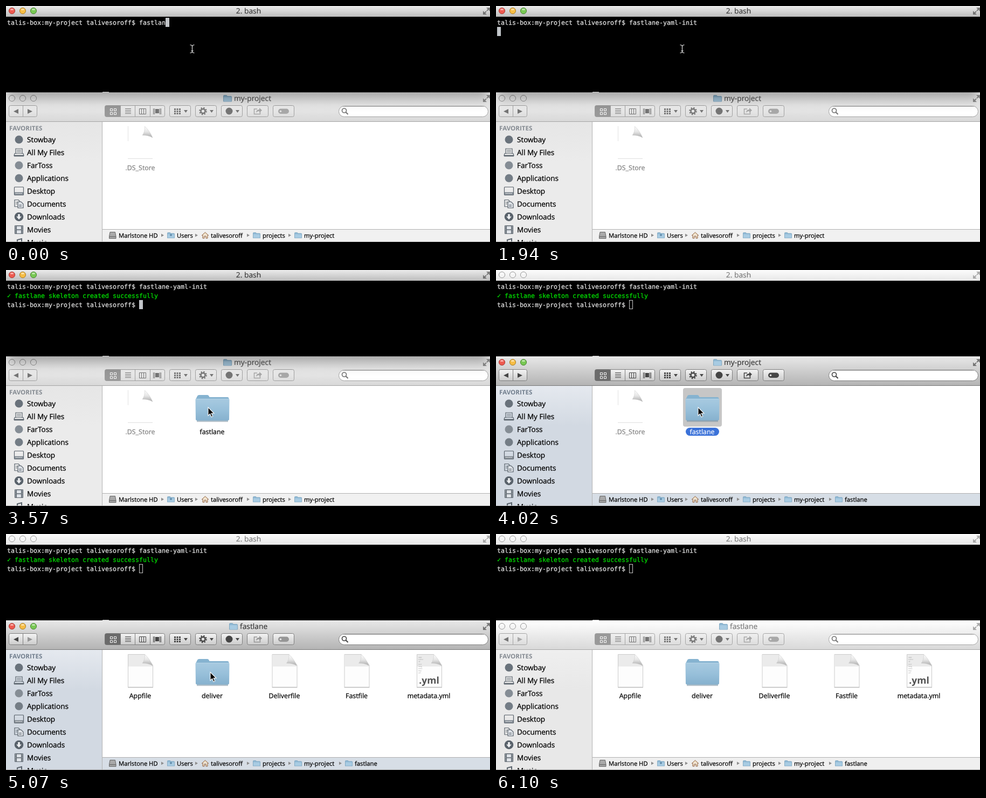
Write an HTML page that moves like this. It is 898 px wide and 440 px high and loops after 6200 ms.

```html
<!DOCTYPE html>
<html lang="en">
<head>
<meta charset="utf-8">
<title>Project setup</title>
<style>
html, body { margin: 0; width: 100%; height: 100%; overflow: hidden; background: #fff; }
svg { display: block; width: 898px; height: 440px; text-rendering: geometricPrecision;
  font-family: "Open Sans", "Noto Sans", sans-serif; }
svg.term { --t1: #ebebeb; --t2: #bcbcbc; --tink: #3a3a3a;
  --f1: #fdfdfd; --f2: #e8e8e8; --f3: #d8d8d8; --fink: #555; --ink: #757575; --dim: #a8a8a8;
  --b1: #f0f0f0; --b2: #dcdcdc; --edge: #a0a0a0; --sel: #999; --line: #a5a5a5;
  --s1: #e6e6e6; --s2: #ebebeb; --path: #f1f1f1; --head: #858b92; }
svg.find { --t1: #fcfcfc; --t2: #e7e7e7; --tink: #7b7b7b;
  --f1: #e8e8e8; --f2: #cdcdcd; --f3: #b3b3b3; --fink: #333; --ink: #454545; --dim: #969696;
  --b1: #f4f4f4; --b2: #cbcbcb; --edge: #7d7d7d; --sel: #6b6b6b; --line: #777;
  --s1: #e5e9ef; --s2: #d2d9e2; --path: #d7dee6; --head: #727f8e; }
svg.idle { --t1: #fcfcfc; --t2: #e7e7e7; --tink: #7b7b7b;
  --f1: #fff; --f2: #ebebeb; --f3: #d8d8d8; --fink: #777; --ink: #757575; --dim: #a8a8a8;
  --b1: #f0f0f0; --b2: #dcdcdc; --edge: #a3a3a3; --sel: #999; --line: #a5a5a5;
  --s1: #efefef; --s2: #e8e8e8; --path: #efefef; --head: #858b92; }
.mono { font: 11.63px "DejaVu Sans Mono", "Liberation Mono", monospace; white-space: pre;
  fill: #dcdcdc; stroke: #dcdcdc; stroke-width: .3; }
.good { fill: #00dc00; stroke: #00dc00; }
.title { font-size: 13.8px; stroke-width: .2; }
.side { font-size: 13.5px; fill: #000; stroke: #000; stroke-width: .3; }
.label { font-size: 12.4px; fill: #000; stroke: #000; stroke-width: .25; text-anchor: middle; }
.crumb { font-size: 11.25px; fill: #000; stroke: #000; stroke-width: .25; }
.btn { fill: url(#btn); stroke: var(--edge); }
.ink { fill: var(--ink); }
.pen { fill: none; stroke: var(--ink); }
.icon { fill: none; stroke: #59626b; stroke-width: 1.2; }
</style>
</head>
<body>
<script>
const LOOP = 6200, COL = 7;
const PROMPT = 'talis-box:my-project talivesoroff$ ';

const typed = [[0, 'fastlan'], [150, 'fastlane'], [900, 'fastlane-'], [1050, 'fastlane-yaml-init ']];
const pointer = [
  [0, 345.5, 80], [2990, 345.5, 117], [3130, 366, 193], [3280, 370, 226], [3420, 372, 249],
  [3570, 375, 256], [4620, 376, 257], [5070, 379, 257.5], [5220, 567, 375], [5360, 688, 422],
  [5510, 761, 438], [5660, 761, 470]
];

const text = (cls, x, y, s, extra = '') => `<text class="${cls}" x="${x}" y="${y}" ${extra}>${s}</text>`;
const rect = (x, y, w, h, extra = '') => `<rect x="${x}" y="${y}" width="${w}" height="${h}" ${extra}/>`;
const path = (d, extra = '') => `<path d="${d}" ${extra}/>`;
const dot = (x, y, r, extra = '') => `<circle cx="${x}" cy="${y}" r="${r}" ${extra}/>`;
const grad = (id, ...stops) => `<linearGradient id="${id}" x2="0" y2="1">` + stops.map((c, i) =>
  `<stop offset="${i / (stops.length - 1)}" style="stop-color:${c}"/>`).join('') + '</linearGradient>';

const lights = (id, y) => `<g id="${id}" stroke-width="1">` + [11, 31, 51].map(x =>
  dot(x, y, 5.6) + `<ellipse cx="${x}" cy="${y - 2.6}" rx="3" ry="1.7" fill="#fff" stroke="none" opacity=".5"/>`).join('') + '</g>';

const corners = (y, ink) => `<g style="fill:var(${ink});stroke:var(${ink})" opacity=".6">` +
  path(`M885 ${y + 13}v-7l7 7zM898 ${y}v7l-7-7z`, 'stroke="none"') +
  path(`M888 ${y + 10}l3-3M895 ${y + 3}l-3 3`, 'stroke-width="2"') + '</g>';

const mini = (x, y, w = 14) => `<g transform="translate(${x} ${y}) scale(${w / 14})">` +
  path('M.5 10.500V1.500q0-1 1-1h4l1.200 1.500h6q.800 0 .800 1v7.500z', 'fill="#8fb8d4" stroke="#6f9cb9" stroke-width=".7"') +
  rect(1, 3.5, 12, 6.8, 'fill="#a8cbe2"') + '</g>';

const folder = () =>
  path('M354 282.500h58', 'stroke="#8a9aa6" stroke-width="1.5" opacity=".6"') +
  path('M352 279V241l2.500-5q1-3 4-3h15q2 0 3 2l1 2h33q3 0 3 3v39z', 'fill="#86b3d0"') +
  path('M351.500 242q0-2 2-2h59q2 0 2 2l-.500 36q0 2.500-2.500 2.500h-57q-2.500 0-2.500-2.500z', 'fill="url(#blue)"') +
  path('M353 240.500h60', 'stroke="#b5d3e6"') + path('M354 281h58', 'stroke="#638ba7"');

const curl = x => path(`M${x} 241q5-6 4.500-16.500 9 8 14.500 21-8-5-19-4.500z`, 'fill="url(#curl)" stroke="#c4c4c4" stroke-width=".5"');

const sheet = cx => {
  const l = cx - 23;
  return path(`M${l + .5} 224.500h31l15 20v41h-46z`, 'fill="#fdfdfd" stroke="#cbcbcb"') +
    path(`M${l + 1} 225h31l14 20v2h-45z`, 'fill="#ebebeb"') +
    path(`M${l} 286h47`, 'stroke="#b5b5b5"') + curl(l + 27);
};

const yml = () => sheet(785) +
  '<g font-size="3.5" fill="#a5a5a5">' + ['app:', 'name', 'id:', 'text', 'lang', 'note', 'key:', 'url:'].map((s, i) =>
    `<text x="765" y="${231 + i * 4.2}">${s}</text>`).join('') + '</g>' +
  '<text x="785" y="279" font-size="17.500" font-weight="700" text-anchor="middle" fill="#505050">.yml</text>';

const sideItems = [
  ['Stowbay', () => dot(24, 0, 7.5, 'fill="#69727b"')],
  ['All My Files', () => path('M18-7h12v9H18zM16 2h16l1 4H15zM20-4h8M20-1h8', 'class="icon"') + rect(15, 5, 18, 2.5, 'fill="#59626b"')],
  ['FarToss', () => dot(24, 0, 7.5, 'fill="#858d95"')],
  ['Applications', () => dot(24, 0, 7.5, 'fill="#747d86"')],
  ['Desktop', () => rect(15.5, -7.5, 17, 15, 'class="icon" rx="1"') + rect(16, 2, 16, 5, 'fill="#8a929a"') + path('M18 4.500h12', 'stroke="#eee" stroke-dasharray="2 1"')],
  ['Documents', () => path('M16-7.500h7l3 3V5H16z', 'class="icon"') + path('M22-4h6l4 4v7.500H22z', 'class="icon" style="fill:#dfe3e8"') + path('M24 2h5M24 4.500h5M18-3h4M18 0h3', 'class="icon" stroke-width="1"')],
  ['Downloads', () => dot(24, 0, 8.3, 'fill="#59626b"') + path('M22.200-5h3.600v4.500h3L24 5.200 19.200-.500h3z', 'fill="#eef0f2"')],
  ['Movies', () => rect(16, -8, 16, 16, 'fill="#59626b" rx="1"') + rect(20, -6.5, 8, 6, 'fill="#dfe3e8"') + rect(20, 1, 8, 6, 'fill="#dfe3e8"') + path('M18-7v14M30-7v14', 'stroke="#dfe3e8" stroke-width="1.500" stroke-dasharray="1.500 1.500"')],
  ['Music', () => path('M21 6V-5l8-2V5', 'class="icon" style="stroke-width:2"') + dot(19, 6, 2.5, 'fill="#59626b"')]
];

const sidebar = () => rect(0, 216, 178, 224, 'fill="url(#side)"') +
  text('', 6, 232, 'FAVORITES', 'font-size="11.600" font-weight="700" style="fill:var(--head)"') +
  sideItems.map(([name, icon], i) => `<g transform="translate(0 ${249 + 24 * i})">${icon()}${text('side', 39, 4.8, name)}</g>`).join('') +
  rect(178, 216, 1, 224, 'fill="#b3b3b3"');

const house = path('M363 428l6.500-6 6.500 6M365 427v6h3v-4h3v4h3v-6', 'fill="#f3e3c8" stroke="#8a5b3a"');
const disk = path('M193 421.500h9.500l1.500 8v4h-12.500v-4z', 'fill="#a9a9a9" stroke="#666"') + path('M192 430h12', 'stroke="#555"');
const crumbs = [[209, 'Marlstone HD', disk], [317, 'Users'], [380, 'talivesoroff', house], [476, 'projects'], [553, 'my-project'], [647, 'fastlane']];
const crumb = ([x, name, icon], i) =>
  (i ? path(`M${x - 29} 424.500l5 3-5 3z`, 'fill="#8d8d8d"') : '') + (icon || mini(x - 18, 422)) +
  (i === 1 ? dot(306, 427, 2, 'fill="#648eab"') : '') + text('crumb', x, 431.5, name);

const pathBar = () => rect(179, 416, 719, 24, 'style="fill:var(--path)"') + rect(179, 416, 719, 1, 'fill="#b0b0b0"') +
  crumbs.slice(0, 5).map(crumb).join('') + `<g id="lastCrumb">${crumb(crumbs[5], 5)}</g>`;

const button = (x, w) => rect(x + .5, 185.5, w - 1, 21, 'class="btn" rx="3"');
const drop = x => path(`M${x - 3.5} 194h7l-3.500 5z`, 'class="ink"');

const toolbar = () => button(5, 53) + path('M31.500 186v20', 'class="pen" style="stroke:var(--edge)"') +
  path('M23 192v9l-9-4.500z', 'class="ink"') + path('M40 192v9l9-4.500z', 'id="forward"') +
  button(183, 112) + rect(183.5, 185.5, 29, 21, 'rx="3" style="fill:var(--sel)"') +
  path('M212.500 186v20M239.500 186v20M267.500 186v20', 'style="stroke:var(--edge)"') +
  path('M193.500 191.500h4v4h-4zM200.500 191.500h4v4h-4zM193.500 198.500h4v4h-4zM200.500 198.500h4v4h-4z', 'fill="none" stroke="#fff"') +
  path('M221 191.500h11M221 194.500h11M221 197.500h11M221 200.500h11', 'class="pen"') +
  path('M247.500 191.500h12v10h-12zM251.500 191v11M255.500 191v11', 'class="pen"') +
  path('M273.500 191v11M275.500 191v11M285.500 191v11M287.500 191v11', 'class="pen"') + rect(277, 192, 7, 8, 'class="ink"') +
  button(303, 40) + [312, 316.5, 321].map(x => [191, 195, 199].map(y => rect(x, y, 3, 3, 'class="ink"')).join('')).join('') + drop(333.5) +
  button(351, 40) + dot(365.5, 196, 4, 'class="pen" stroke-width="2.500"') + dot(365.5, 196, 6.2, 'class="pen" stroke-width="2.200" stroke-dasharray="2.430 2.440"') + drop(381.5) +
  button(399, 40) + dot(414, 196, 6.5, 'class="ink"') + drop(429.5) +
  button(447, 40) + button(495, 40) + '<g id="share">' +
  path('M466 192h-5.500v9.500h11V197', 'fill="none" stroke="currentColor" stroke-width="1.500"') +
  path('M464 199q0-6 6-6v-3l5 4.500-5 4.500v-3q-4 0-6 3z', 'fill="currentColor"') +
  rect(505, 191.5, 20, 9.5, 'rx="4.700" fill="currentColor"') + dot(509.5, 196.2, 1.7, 'fill="#e4e4e4"') + '</g>' +
  rect(617.5, 186.5, 277, 20, 'rx="10" fill="#fff" style="stroke:var(--edge)"') + path('M623 187.500h266', 'stroke="#c4c4c4"') +
  dot(627.5, 195, 4, 'class="pen" stroke-width="1.700"') + path('M630.500 198l4 4', 'class="pen" stroke-width="2.200"');

const terminal = () => rect(0, 0, 898, 161, 'fill="#000"') + rect(179, 160, 12, 1, 'fill="#cfcfcf"') +
  rect(0, 0, 898, 20, 'fill="url(#bar1)"') + lights('lights1', 9) +
  text('title', 450, 14, '2. bash', 'text-anchor="middle" style="fill:var(--tink);stroke:var(--tink)"') + corners(3, '--tink') +
  text('mono', 2, 34.5, '', 'id="command"') +
  `<g id="output">${text('mono good', 2, 51.5, '✓ fastlane skeleton created successfully')}${text('mono', 2, 68.5, PROMPT)}</g>` +
  rect(0, 22, 7, 17, 'id="block" fill="#c2c5c9"') + rect(247.5, 56.5, 6, 16, 'id="hollow" fill="none" stroke="#c8c8c8"');

const heading = (id, x, name) => `<g id="${id}">${mini(x, 166, 16)}` +
  text('title', x + 20, 177, name, 'style="fill:var(--fink);stroke:var(--fink)"') + '</g>';

const finder = () => rect(0, 161, 898, 55, 'fill="url(#bar2)"') +
  rect(0, 215, 898, 1, 'style="fill:var(--line)"') + lights('lights2', 172) + corners(166, '--fink') +
  heading('titleA', 403, 'my-project') + heading('titleB', 414, 'fastlane') +
  toolbar() + rect(0, 120, 898, 54, 'id="shadow" filter="url(#soft)" opacity=".35"') +
  sidebar() + rect(179, 216, 719, 200, 'fill="#fff"') +
  '<g id="project">' + path('M226.500 224v28', 'stroke="#e2e2e2"') + path('M226 284.500h46', 'stroke="#dedede"') + curl(253) +
  text('label', 249, 306, '.DS_Store', 'style="fill:#828282;stroke:#828282"') + '</g>' +
  '<g id="picked">' + rect(347, 220, 72, 72, 'rx="4" fill="#c6c6c6"') + rect(352, 294, 62, 15, 'rx="7.500" fill="#3b72d9"') + '</g>' +
  `<g id="folder">${folder()}${text('label', 382.5, 306, '', 'id="folderName"')}</g>` +
  '<g id="files">' + [[249, 'Appfile'], [516.5, 'Deliverfile'], [650.5, 'Fastfile']].map(([x, s]) => sheet(x) + text('label', x, 306, s)).join('') +
  yml() + text('label', 784.5, 306, 'metadata.yml') + '</g>' +
  pathBar() + rect(0, 439, 898, 1, 'fill="#a9a9a9"');

const pointers = '<g id="beam">' +
  path('M-4-7.500q3.500 0 4 2.500 .500-2.500 4-2.500M0-5V5M-4 7.500q3.500 0 4-2.500 .500 2.500 4 2.500M-2 3.500h4', 'fill="none" stroke="#e6e6e6" stroke-width="1.200"') + '</g><g id="arrow">' +
  path('M0 0v15.500l3.600-3.300 2.500 5.700 2.500-1.100-2.500-5.500H11z', 'stroke="#fff" stroke-width="1.100"') + '</g>';

document.body.innerHTML = '<svg viewBox="0 0 898 440" class="term"><defs>' +
  grad('bar1', 'var(--t1)', 'var(--t2)') + grad('bar2', 'var(--f1)', 'var(--f2)', 'var(--f3)') +
  grad('btn', 'var(--b1)', 'var(--b2)') + grad('side', 'var(--s1)', 'var(--s2)', 'var(--s2)', 'var(--s2)') +
  grad('blue', '#a7cae0', '#98c0da', '#86b1ce') + grad('curl', '#fff', '#e4e4e4', '#a8a8a8') +
  '<filter id="soft" filterUnits="userSpaceOnUse" x="-40" y="80" width="978" height="136"><feGaussianBlur stdDeviation="11"/></filter>' +
  `</defs>${finder()}${terminal()}${pointers}</svg>`;

const svg = document.querySelector('svg');
const el = id => document.getElementById(id);
const show = (id, on) => el(id).setAttribute('visibility', on ? 'visible' : 'hidden');
const at = (table, t) => table.findLast(row => row[0] <= t);
const setText = (id, s) => { if (el(id).textContent !== s) el(id).textContent = s; };

function paintLights(id, active) {
  const colours = [['#ee5a50', '#a83a34'], ['#f6bd45', '#a87c25'], ['#78c853', '#478432']];
  el(id).querySelectorAll('circle').forEach((c, i) => {
    const [fill, stroke] = active ? colours[i] : ['#f4f4f4', '#9b9b9b'];
    c.setAttribute('fill', fill);
    c.setAttribute('stroke', stroke);
  });
}

function draw(t) {
  const mode = t < 4020 ? 'term' : t < 6100 ? 'find' : 'idle';
  const opened = t >= 4170, done = t >= 2090, picked = mode === 'find' && !opened;
  svg.setAttribute('class', mode);
  paintLights('lights1', mode === 'term');
  paintLights('lights2', mode === 'find');
  show('shadow', mode === 'term');

  const command = PROMPT + at(typed, t)[1];
  setText('command', command);
  const [col, row] = done ? [PROMPT.length, 2] : t >= 1940 ? [0, 1] : [command.length, 0];
  el('block').setAttribute('x', 2 + col * COL);
  el('block').setAttribute('y', 22 + row * 17);
  show('block', mode === 'term');
  show('hollow', mode !== 'term');
  show('output', done);

  show('titleA', !opened);
  show('titleB', opened);
  show('project', !opened);
  show('files', opened);
  show('folder', done);
  show('picked', picked);
  show('lastCrumb', mode !== 'term');
  setText('folderName', opened ? 'deliver' : 'fastlane');
  el('folderName').style.cssText = picked ? 'fill:#fff;stroke:#fff' : '';
  el('forward').style.fill = opened ? 'var(--dim)' : 'var(--ink)';
  el('share').style.color = picked ? 'var(--ink)' : 'var(--dim)';

  const [, x, y] = at(pointer, t);
  for (const id of ['beam', 'arrow']) {
    el(id).setAttribute('transform', `translate(${x} ${y})`);
    show(id, (id === 'beam') === (t < 3130));
  }
}

const start = performance.now();
function tick() {
  draw((performance.now() - start) % LOOP);
  requestAnimationFrame(tick);
}
tick();
</script>
</body>
</html>
```
